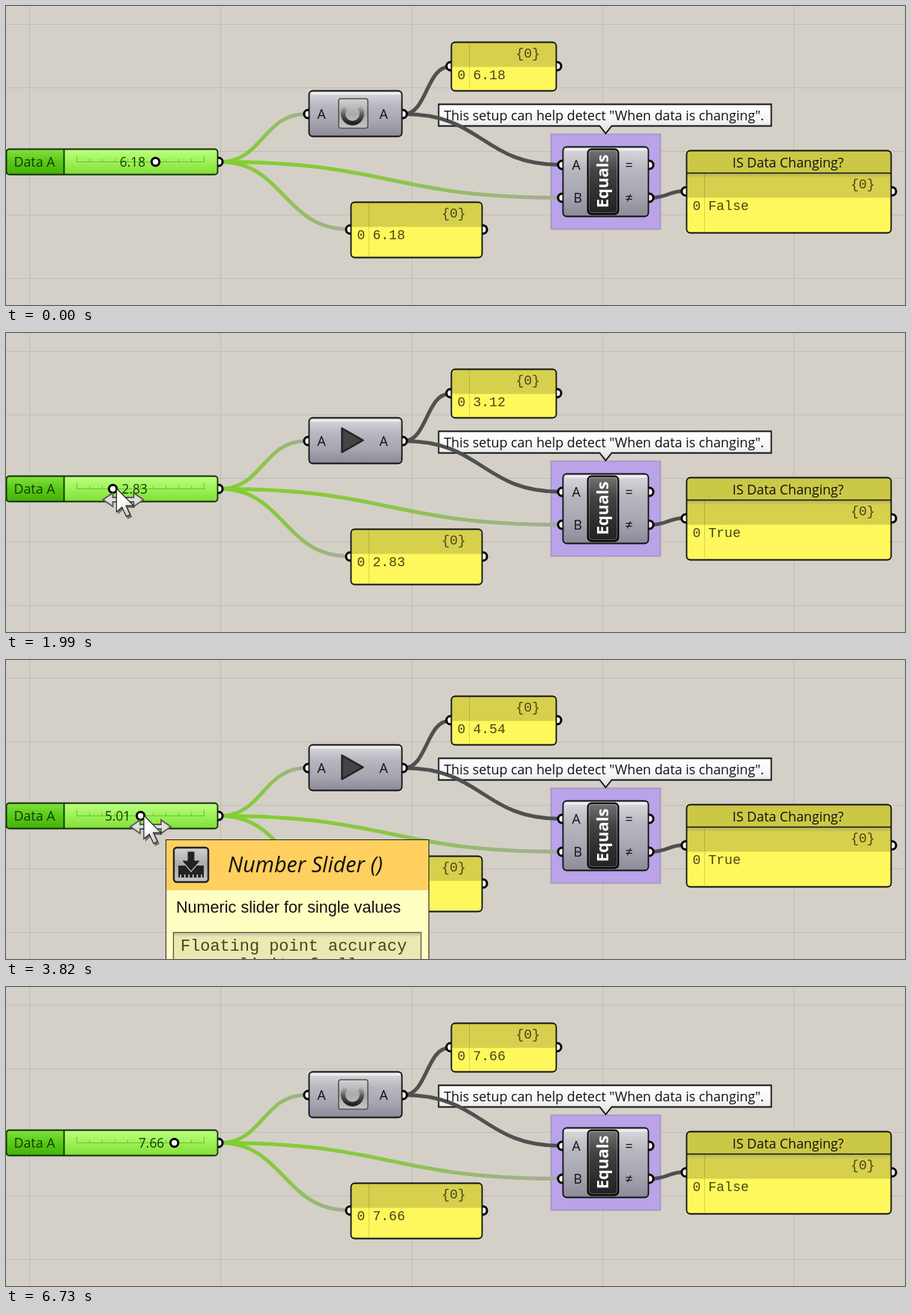
Write an HTML page that moves like this. It is 1200 by 400 pixels and loops after 7120 ms.

```html
<!DOCTYPE html>
<html lang="en">
<head>
<meta charset="utf-8">
<title>Detecting changing data</title>
<style>
  html, body { margin: 0; width: 100%; height: 100%; overflow: hidden; background: #d4d0c8; }
  svg { display: block; width: 1200px; height: 400px; }
  text { font: 17.8px "Open Sans", "Noto Sans", sans-serif; fill: #111; white-space: pre; }
  .mono { font: 18px "Liberation Mono", "DejaVu Sans Mono", monospace; fill: #48441a; }
  .green { fill: #143c00; }
  .wire { fill: none; stroke: #505050; stroke-width: 5; }
  .edge { stroke: #111; stroke-width: 1.8; }
  .grip { fill: #fff; stroke: #000; stroke-width: 3; }
</style>
</head>
<body>
<svg id="stage" viewBox="0 0 1200 400"></svg>
<script>
const LOOP = 7120;
const STEPS = 10; // visible positions per pointer move

const REST = { x: 400, y: 255, value: 6.18 };
const MOVES = [
  { start: 190, end: 800, x: 197, y: 199, value: 6.18 },
  { start: 930, end: 1610, x: 152, y: 208, value: 3.12 },
  { start: 1680, end: 1990, x: 147.5, y: 208, value: 2.83 },
  { start: 2800, end: 3450, x: 184, y: 208, value: 5.01 },
  { start: 4270, end: 4570, x: 118, y: 210, value: 1.54 },
  { start: 5630, end: 6330, x: 226, y: 208, value: 7.66 },
  { start: 6400, end: 6730, x: 1040, y: 368, value: 7.66 }
];

const RELEASES = [0, 1670, 2310, 3240, 3960, 4960, 6532];
const PRESSES = [[930, 1960], [2800, 3430], [4270, 4700], [5630, 6300]];
const TOOLTIPS = [[2370, 2800], [3820, 4070]];

const rect = (x, y, x2, y2, fill, extra = '') =>
  `<rect x="${x}" y="${y}" width="${x2 - x}" height="${y2 - y}" fill="${fill}" ${extra}/>`;
const text = (x, y, str, extra = '') => `<text x="${x}" y="${y}" ${extra}>${str}</text>`;
const grip = (x, y) => `<circle class="grip" cx="${x}" cy="${y}" r="5.6"/>`;
const line = (x, y, x2, y2, color, width = 1) =>
  `<path d="M${x} ${y}L${x2} ${y2}" stroke="${color}" stroke-width="${width}"/>`;
const wire = (x, y, x2, y2, extra = '') => {
  const mid = (x + x2) / 2;
  return `<path class="wire" d="M${x} ${y}C${mid} ${y} ${mid} ${y2} ${x2} ${y2}" ${extra}/>`;
};
const gradient = (id, colors, dir = 'x2="0" y2="1"') =>
  `<linearGradient id="${id}" ${dir}>` +
  colors.map((color, i) => `<stop offset="${i / (colors.length - 1)}" stop-color="${color}"/>`).join('') +
  '</linearGradient>';
const repeat = (count, make) => Array.from({ length: count }, (_, i) => make(i)).join('');

function panel(id, x, y, x2, y2, bandTop, value, title = '') {
  const band = bandTop + 33, middle = (y + y2) / 2 - 0.5;
  return grip(x - 1, middle) + grip(x2 + 1, middle) +
    rect(x, y, x2, y2, '#fff85c', 'rx="5"') +
    `<path fill="#d6d04c" d="M${x} ${band}V${y + 5}q0-5 5-5H${x2 - 5}q5 0 5 5V${band}z"/>` +
    (title && rect(x + 1, y + 1, x2 - 1, bandTop, '#cbc846', 'rx="3"') +
      rect(x + 1, bandTop, x2 - 1, bandTop + 7, 'url(#shade)') +
      line(x, bandTop, x2, bandTop, '#111', 1.6) +
      text((x + x2) / 2 - 1, bandTop - 8, title, 'text-anchor="middle"')) +
    line(x + 24, bandTop + 1, x + 24, y2 - 2, '#00000026') +
    rect(x, y, x2, y2, 'none', 'rx="5" class="edge"') +
    text(x2 - 54, bandTop + 20, '{0}', 'class="mono"') +
    text(x + 8, bandTop + 49.5, '0', 'class="mono"') +
    text(x + 29, bandTop + 49.5, value, `class="mono" id="${id}"`);
}

const component = (x, y, x2, y2) =>
  rect(x, y, x2, y2, 'url(#metal)', 'rx="5"') +
  rect(x + 2, y + 2, x2 - 2, y + 5, '#ffffffa0', 'rx="2"') +
  rect(x, y, x2, y2, 'none', 'rx="5" class="edge"');

const defs = '<defs>' +
  gradient('metal', ['#dcdbe0', '#b8b6bf', '#a8a6b1', '#8c8a98']) +
  gradient('fade', ['#82cf2a', '#8bc64a', '#a7ab9b'], 'x2="1" y2="0"') +
  gradient('label', ['#fff', '#f6f7f6', '#d8dcda']) +
  gradient('track', ['#bfff86', '#9cf256', '#82dd38']) +
  gradient('name', ['#83e13e', '#58c918', '#45b00a']) +
  gradient('dark', ['#747474', '#444', '#303030', '#222']) +
  gradient('button', ['#d2d2d2', '#aaa', '#c4c4c4']) +
  gradient('shade', ['#7775', '#7770']) +
  gradient('ring', ['#aaa', '#555', '#222']) +
  gradient('pointer', ['#fff', '#fff', '#c4c4c4'], 'x2="0.6" y2="1"') +
  '</defs>';

const grid = repeat(5, i => {
  const x = 31.5 + 255 * i, y = 24.5 + 85 * i;
  return line(x, 0, x, 400, '#c1bdb6') + line(0, y, 1200, y, '#c1bdb6');
});

const group = rect(727, 171, 873, 298, '#baa3e8', 'stroke="#a296bd" stroke-width="1.6"');

const noteBox = '<path class="edge" fill="url(#label)" d="M577 131H1021V160H808L800 170L792 160H577z"/>';
const noteText = text(584, 152, 'This setup can help detect "When data is changing".');

const fading = 'style="stroke:url(#fade)"';
const wires = wire(285, 208, 400, 144, fading) + wire(285, 208, 740, 256, fading) +
  wire(285, 208, 456, 298, fading) +
  wire(531, 144, 591, 81) + wire(531, 144, 740, 212) + wire(860, 256, 906, 247);

const dam = grip(403, 144) + grip(529, 144) + component(404, 113, 528, 174) +
  text(415, 150, 'A') + text(498, 150, 'A') +
  '<g id="idle">' + rect(443.5, 123.5, 482.5, 163, 'url(#button)', 'rx="3" stroke="#555" stroke-width="1.6"') +
  '<path d="M453 135A12.5 12.5 0 1 0 471 135" fill="none" stroke="url(#ring)" stroke-width="6"/></g>' +
  '<path id="play" d="M448 127L476 143L448 159z" fill="#444447" stroke="#222" stroke-width="2.5" stroke-linejoin="round"/>';

const equals = [212, 256].map(y => grip(742, y) + grip(858, y)).join('') +
  component(743, 188, 857, 281) +
  text(755, 218, 'A') + text(757, 262, 'B') + text(826, 218, '=') + text(826, 262, '≠') +
  rect(776, 191, 817, 278, 'url(#dark)', 'rx="5" stroke="#000" stroke-width="1.8"') +
  rect(778, 193, 815, 276, 'none', 'rx="4" stroke="#ffffff40"') +
  text(0, 0, 'Equals', 'transform="translate(803 234) rotate(-90)" text-anchor="middle" style="font-size:22px;font-weight:700;fill:#fff"');

const ticks = repeat(11, i => {
  const x = 94 + 17 * i;
  return line(x, i % 10 ? 204 : 200, x, 208, '#6fbd3a');
});

const slider = grip(283, 208) +
  rect(-1, 191, 282, 225, 'url(#track)', 'rx="4"') +
  rect(-1, 191, 77, 225, 'url(#name)', 'rx="3"') +
  line(94, 208, 265, 208, '#6fbd3a') + ticks +
  line(77, 191, 77, 225, '#0c3000', 1.8) +
  rect(0, 191, 282, 225, 'none', 'rx="4" stroke="#0c3000" stroke-width="1.8"') +
  text(10, 214.5, 'Data A', 'class="green"') +
  text(0, 214.5, '', 'id="reading" class="green" style="font-size:17.3px"') +
  '<circle id="knob" class="grip" cy="208" r="5.2"/>';

const tooltip = '<g id="tooltip">' +
  rect(0.5, 0.5, 351.5, 180, '#ffffc2') + rect(0.5, 0.5, 351.5, 68, '#ffd05f') +
  rect(0.5, 0.5, 351.5, 180, 'none', 'stroke="#222"') +
  rect(11, 11, 57, 57, 'url(#button)', 'rx="4" stroke="#222" stroke-width="2.4"') +
  rect(17, 35, 51, 51, '#222') +
  repeat(6, i => line(20 + 5.6 * i, 47, 20 + 5.6 * i, 51, '#ddd', 1.5)) +
  '<path d="M29 16H39V28H47L34 43L21 28H29z" fill="#222" stroke="#bbb" stroke-width="1.2"/>' +
  text(83, 44, 'Number Slider ()', 'style="font-size:28.8px;font-style:italic"') +
  text(14, 98, 'Numeric slider for single values', 'style="font:21.6px \'Liberation Sans\',Arial,sans-serif"') +
  rect(10.5, 124.5, 341, 190, '#ebe9b2', 'stroke="#55533c" stroke-width="1.3"') +
  rect(11, 125, 340, 131, 'url(#shade)') +
  ['Floating point accuracy', '      limit of all'].map((str, i) =>
    text(20, 149 + i * 24.5, str, 'class="mono" style="font-size:21.9px"')).join('') +
  '</g>';

const cursor = '<circle id="press" r="24" fill="#ffe11e" fill-opacity=".68"/>' +
  '<g id="cursor"><g id="drag">' +
  '<path d="M-18 15L-5 6V12H23V6L36 15L23 24V18H-5V24z" fill="#dededa" stroke="#585858" stroke-width="1.8"/>' +
  '<path d="M2 3V35L9 28L15 41L21 38L15 26H25z" fill="#0007"/></g>' +
  '<path d="M0 0V31.5L7.3 25L13 37.5L18.3 35L12.7 23.2H23z" fill="url(#pointer)" stroke="#222" stroke-width="1.2"/></g>';

const diagram = group + noteBox + wires + noteText +
  panel('released', 594, 48, 734, 113, 48, '6.18') +
  panel('live', 460, 262, 635, 336, 262, '6.18') +
  panel('verdict', 908, 193, 1181, 303, 223, 'False', 'IS Data Changing?') +
  dam + equals + slider;

document.getElementById('stage').innerHTML = defs + grid +
  `<g transform="translate(.5 .5)">${diagram}</g>` + tooltip + cursor;

const el = id => document.getElementById(id);
const show = (id, on) => el(id).setAttribute('visibility', on ? 'visible' : 'hidden');
const place = (id, x, y) => el(id).setAttribute('transform', `translate(${x} ${y})`);
const within = (ranges, t) => ranges.some(([from, to]) => t >= from && t < to);
const mix = (a, b, k) => a + (b - a) * k;
const ease = p => p * p * (3 - 2 * p);

function stateAt(t) {
  return MOVES.filter(move => t >= move.start).reduce((from, to) => {
    const passed = Math.min(1, (t - to.start) / (to.end - to.start));
    const k = ease((Math.floor(passed * (STEPS - 1)) + 1) / STEPS);
    return { x: mix(from.x, to.x, k), y: mix(from.y, to.y, k), value: mix(from.value, to.value, k) };
  }, REST);
}

function draw(t) {
  const { x, y, value } = stateAt(t);
  const live = value.toFixed(2);
  const released = stateAt(RELEASES.findLast(at => t >= at)).value.toFixed(2);
  const changing = live !== released;
  const knob = 94 + 17 * value;

  el('live').textContent = live;
  el('released').textContent = released;
  el('verdict').textContent = changing ? 'True' : 'False';
  show('play', changing);
  show('idle', !changing);

  el('knob').setAttribute('cx', knob);
  const reading = el('reading'), before = value > 5;
  reading.textContent = live;
  reading.setAttribute('x', knob + (before ? -13.5 : 12));
  reading.setAttribute('text-anchor', before ? 'end' : 'start');

  show('cursor', t >= 190 && t < 6730);
  el('drag').style.display = t >= 930 && t < 6330 ? '' : 'none';
  place('cursor', x, y);
  show('press', within(PRESSES, t));
  place('press', x, y + 2);
  show('tooltip', within(TOOLTIPS, t));
  place('tooltip', Math.round(x + 28.6), 240);
}

const began = performance.now();
function tick() {
  draw((performance.now() - began) % LOOP);
  requestAnimationFrame(tick);
}
tick();
</script>
</body>
</html>
```
